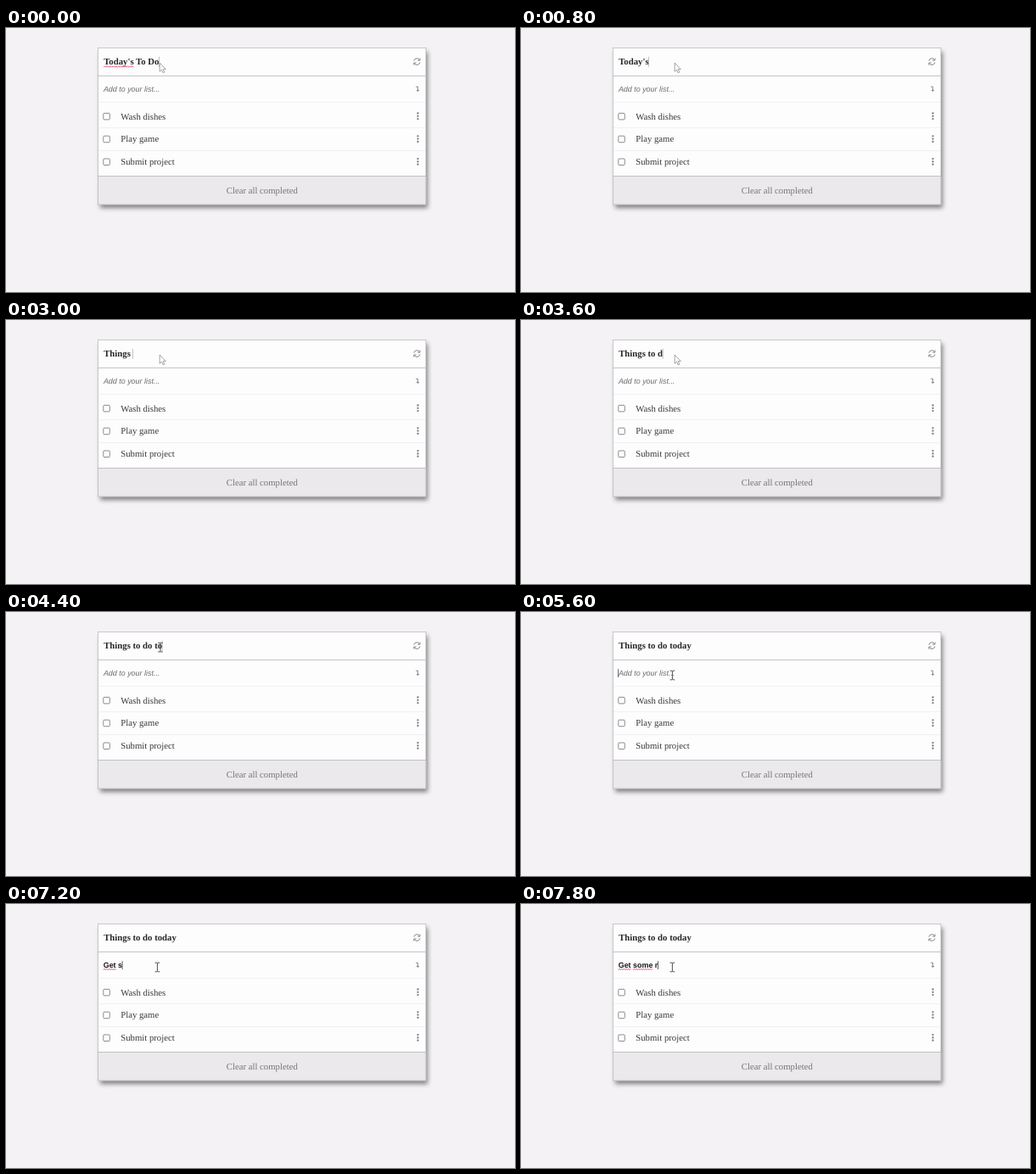
These frames come from a looping animation (600 px wide and 311 px high, 8000 ms). An HTML page:

```html
<!DOCTYPE html>
<html lang="en">
<head>
<meta charset="utf-8">
<title>To do list</title>
<style>
  html, body { margin: 0; width: 100%; height: 100%; overflow: hidden; background: #f4f2f5; }
  svg { position: absolute; left: 0; top: 0; }
  .card {
    position: absolute; left: 108px; top: 23px; width: 387.3px; height: 185.3px;
    background: #fefdfe; box-shadow: 3.35px 5.36px 5.36px gray;
  }
  text {
    font: 10.74px "Liberation Serif", "Times New Roman", serif;
    fill: #383838; white-space: pre; text-rendering: geometricPrecision;
  }
  #title { font-weight: bold; fill: #282828; }
  #entry, #hint { font: bold 8.93px "Liberation Sans", Arial, sans-serif; fill: #181818; }
  #hint { font-weight: normal; font-style: italic; fill: #6c6c6c; }
  .clear { fill: #757575; text-anchor: middle; }
  .wave { fill: none; stroke: #e0305a; stroke-width: .8; }
  .icon { fill: none; stroke: #858585; stroke-width: 1; }
  .box { fill: #fff; stroke: #767676; stroke-width: .85; }
  .dots { fill: #777; }
  .line { stroke: #f1f0f2; }
  .edge { stroke: #c2c1c3; fill: none; }
  .frame { stroke: #b4b3b5; stroke-width: .7; fill: none; }
</style>
</head>
<body>
<div class="card"></div>
<svg width="600" height="311" viewBox="0 0 600 311">
  <rect x="108" y="175" width="387.3" height="33.3" fill="#ebe9ec"/>
  <path class="line" d="M108.7 87.5H494.7M108.7 117.5H494.7M108.7 144.5H494.7"/>
  <path class="edge" d="M108 56.4H495.3M108 174.5H495.3"/>
  <rect class="frame" x="108.35" y="23.35" width="386.6" height="184.6"/>

  <g class="icon">
    <path d="M480.8 38.7a3.7 3.7 0 0 1 6.6-1.4M488 40.5a3.7 3.7 0 0 1-6.6 1.4"/>
    <path d="M488 35.6V38.2H485.2M480.8 43.6V41H483.6"/>
    <path d="M483.2 69.2H485.4V74.4M483.8 73L485.4 74.6L487 73"/>
  </g>

  <g id="rows"></g>
  <text class="clear" x="301.8" y="194.6">Clear all completed</text>

  <text id="title" x="115.2" y="43.4"></text>
  <text id="hint" x="114.9" y="75.1">Add to your list...</text>
  <text id="entry" x="114.7" y="75.1"></text>
  <path id="marks" class="wave"/>
  <rect id="caret" width=".7"/>

  <path id="arrow" d="M181.2 41V51.3L183.5 49.2L185.1 52.8L186.8 52.1L185.2 48.6H188.3Z"
        fill="#fff" stroke="#8c8c8c" stroke-width=".8" stroke-linejoin="round"/>
  <path id="beam" d="M-2.8-5.3H-.7L0-4.8L.7-5.3H2.8M0-4.8V4.8M-2.8 5.3H-.7L0 4.8L.7 5.3H2.8"
        fill="none" stroke="#3c3c3c" stroke-width=".9"/>
</svg>
<script>
const LOOP = 8000;
const $ = id => document.getElementById(id);

const titleSteps = [
  [0, "Today's To Do"], [200, "Today's To D"], [600, "Today's To"], [800, "Today's"],
  [1000, "Toda"], [1200, "T"], [1400, ""], [1600, "T"], [1800, "Thing"], [2000, "Things"],
  [2200, "Thingst"], [2400, "Thingsto"], [2600, "Thingst"], [2800, "Things"],
  [3000, "Things "], [3200, "Things t"], [3400, "Things to "], [3600, "Things to d"],
  [3800, "Things to do "], [4200, "Things to do t"], [4400, "Things to do to"],
  [4600, "Things to do tod"], [4800, "Things to do today"]
];
const entrySteps = [
  [0, ""], [6600, "G"], [6800, "Ge"], [7000, "Get"], [7200, "Get s"],
  [7400, "Get so"], [7600, "Get some"], [7800, "Get some r"]
];
const caretSteps = [[0, "title"], [5200, ""], [5600, "entry"], [6200, ""], [6600, "entry"]];
const beamSteps = [[0, null], [4400, [182, 41.6]], [5200, [180, 60]], [5400, [178.4, 76]], [5600, [178.4, 74.5]]];

// Value of the last step that has begun
const at = (steps, t) => steps.filter(s => s[0] <= t).pop()[1];
const show = (el, on) => el.setAttribute("visibility", on ? "visible" : "hidden");
const put = (el, attrs) => { for (const k in attrs) el.setAttribute(k, attrs[k]); };
const left = el => +el.getAttribute("x");

$("rows").innerHTML = ["Wash dishes", "Play game", "Submit project"].map((label, i) => {
  const y = 104 + i * 26.8;
  const dots = [-3.3, 0, 3.3].map(d =>
    `<circle class="dots" cx="485.5" cy="${y + d - .2}" r="1.15"/>`).join("");
  return `<rect class="box" x="114.8" y="${y - 3.6}" width="7.5" height="7.5" rx="1"/>
    <text x="135.2" y="${y + 3.6}">${label}</text>${dots}`;
}).join("");

function wave(el, from, to, y) {
  const x = left(el) + (from ? el.getSubStringLength(0, from) : 0);
  const end = x + el.getSubStringLength(from, to - from);
  let d = `M${x} ${y}`;
  for (let n = 1; x + n * 1.35 <= end; n++) d += `L${x + n * 1.35} ${y + (n % 2 ? -.9 : 0)}`;
  return d;
}

let last = "";
function draw() {
  const t = performance.now() % LOOP;
  const title = at(titleSteps, t), entry = at(entrySteps, t);
  const focus = at(caretSteps, t), beam = at(beamSteps, t);
  const key = [title, entry, focus, beam].join("|");
  if (key !== last) {
    last = key;
    $("title").textContent = title;
    $("entry").textContent = entry;
    show($("hint"), !entry);

    let marks = "";
    if (title.startsWith("Today's ")) marks += wave($("title"), 0, 7, 46);
    if (entry.length > 3) marks += wave($("entry"), 0, 3, 77.4);
    if (entry.length > 9) marks += wave($("entry"), 4, 8, 77.4);
    $("marks").setAttribute("d", marks);

    show($("caret"), focus);
    if (focus) {
      const el = $(focus), head = focus === "title";
      put($("caret"), {
        x: left(el) - .3 + (el.textContent ? el.getComputedTextLength() : 0),
        y: head ? 33.8 : 67.2,
        height: head ? 12 : 9.8,
        fill: head ? "#aaa" : "#222"
      });
    }
    show($("arrow"), !beam);
    show($("beam"), beam);
    if (beam) $("beam").setAttribute("transform", `translate(${beam})`);
  }
  requestAnimationFrame(draw);
}
draw();
</script>
</body>
</html>
```
